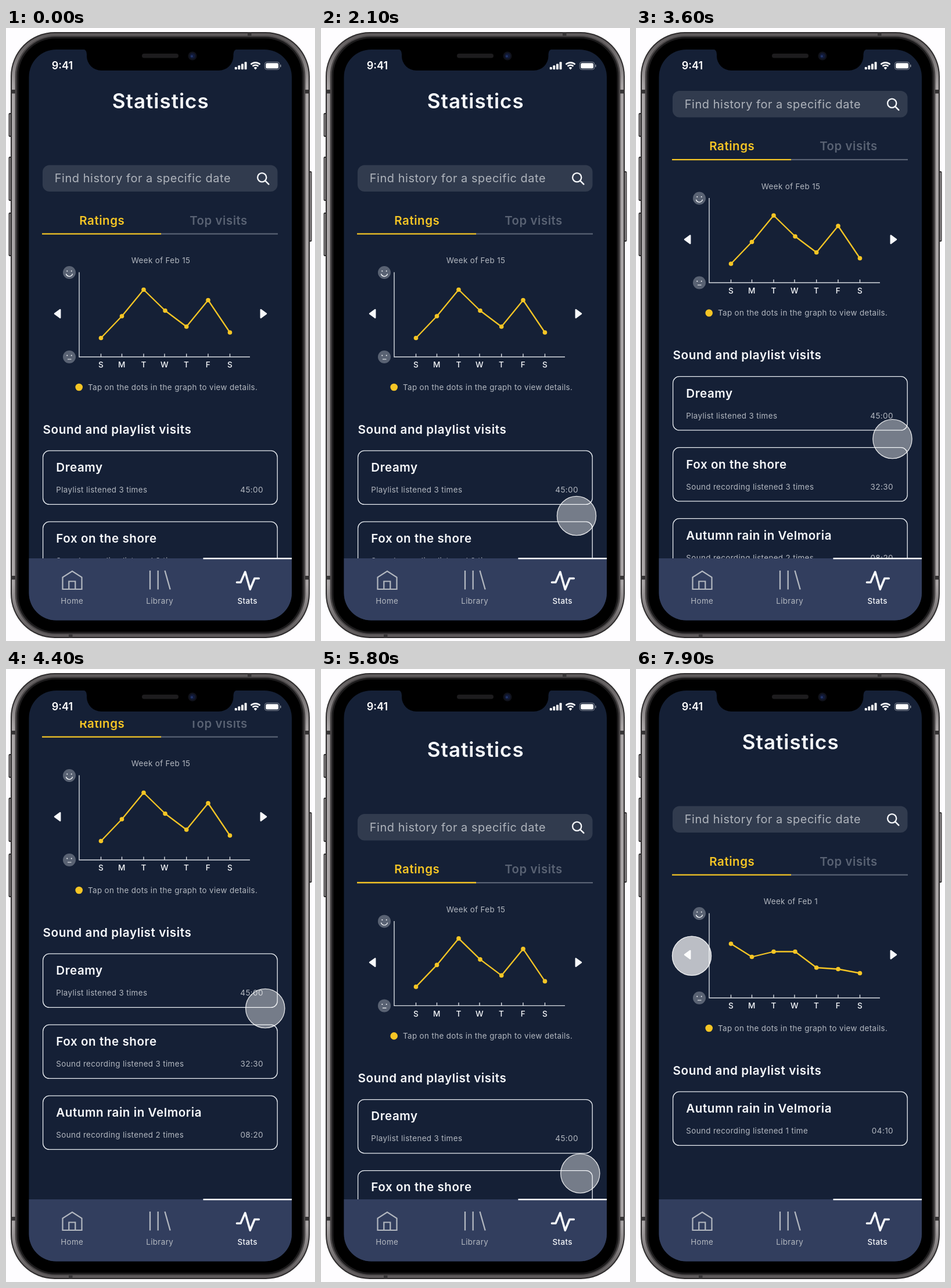
Animation of 532x1053 px, one loop 8 s. Source, as an HTML page with a canvas:

```html
<!DOCTYPE html>
<html lang="en">
<head>
<meta charset="utf-8">
<title>Statistics screen</title>
<style>
html, body { margin: 0; width: 100%; height: 100%; overflow: hidden; background: #fefdff; }
canvas { display: block; width: 532px; height: 1053px; }
</style>
</head>
<body>
<canvas id="stage"></canvas>
<script>
const W = 532, H = 1053, LOOP = 8000, STEP = 100;
const canvas = document.getElementById('stage');
const ratio = window.devicePixelRatio || 1;
canvas.width = W * ratio;
canvas.height = H * ratio;
const ctx = canvas.getContext('2d');
const TAU = Math.PI * 2;

const NAVY = '#152036', WHITE = '#f7f9fc', YELLOW = '#f5c525';
const SOFT = '#b3b8c0', MUTED = '#596273', NAV = '#323e5e';

// ---- drawing helpers ----
function rounded(x, y, w, h, r) {
  ctx.beginPath();
  ctx.roundRect(x, y, w, h, r);
}
function fillRound(x, y, w, h, r, color) {
  rounded(x, y, w, h, r);
  ctx.fillStyle = color;
  ctx.fill();
}
function disc(x, y, r, color) {
  ctx.beginPath();
  ctx.arc(x, y, r, 0, TAU);
  ctx.fillStyle = color;
  ctx.fill();
}
function path(points, color, width, closed) {
  ctx.beginPath();
  points.forEach(([x, y]) => ctx.lineTo(x, y));
  if (closed) ctx.closePath();
  ctx.strokeStyle = color;
  ctx.lineWidth = width;
  ctx.stroke();
}
function arc(x, y, r, from, to, color, width) {
  ctx.beginPath();
  ctx.arc(x, y, r, from, to);
  ctx.strokeStyle = color;
  ctx.lineWidth = width;
  ctx.stroke();
}
function text(str, x, y, size, { weight = 400, color = WHITE, align = 'left', spacing = 0.027 } = {}) {
  ctx.font = `${weight} ${size}px Inter, "Open Sans", sans-serif`;
  ctx.letterSpacing = `${size * spacing}px`;
  ctx.textAlign = align;
  ctx.fillStyle = color;
  ctx.fillText(str, x, y);
}

// ---- motion ----
// Smooth curve through [time, value] keys, flat at turning points and plateaus.
function track(keys, t) {
  const last = keys.length - 1;
  if (t <= keys[0][0]) return keys[0][1];
  if (t >= keys[last][0]) return keys[last][1];
  const slope = i => {
    if (i === 0 || i === last) return 0;
    const [a, b, c] = [keys[i - 1], keys[i], keys[i + 1]];
    return (b[1] - a[1]) * (c[1] - b[1]) <= 0 ? 0 : (c[1] - a[1]) / (c[0] - a[0]);
  };
  const i = keys.findIndex(k => k[0] > t) - 1;
  const [t0, v0] = keys[i], [t1, v1] = keys[i + 1];
  const d = t1 - t0, u = (t - t0) / d, w = 1 - u;
  return v0 * w * w * (1 + 2 * u) + v1 * u * u * (3 - 2 * u)
    + d * u * w * (slope(i) * w - slope(i + 1) * u);
}
const ramp = (t, from, to) => Math.max(0, Math.min(1, (t - from) / (to - from)));
const pulse = (t, at) => Math.max(0, 1 - Math.max(0, Math.abs(t - at) - 50) / 150);

const SCROLL = [[2150, 0], [2800, -89.7], [3200, -89.7], [3600, -127.5], [4400, -237], [4600, -241],
  [5500, -2], [5800, 13.4], [6000, 15], [6150, 15], [6550, 0]];
const FINGER_Y = [[2150, 838], [2800, 748.3], [3200, 748.3], [3600, 706], [4400, 583], [4600, 575],
  [5500, 840], [5800, 866.5], [6000, 870]];
const FINGER_X = [[3200, 440], [3600, 441.5], [4400, 446.3]];

// ---- content ----
const DAYS = [163.5, 199.5, 237, 273, 310.7, 348, 385.5];
const LATE = [532.5, 495, 449.5, 485.5, 513, 467.5, 523];
const EARLY = [472, 494.5, 485.5, 485.5, 513, 515.5, 522.5];
const CARDS = [
  ['Dreamy', 'Playlist listened 3 times', '45:00'],
  ['Fox on the shore', 'Sound recording listened 3 times', '32:30'],
  ['Autumn rain in Velmoria', 'Sound recording listened 2 times', '08:20']
];
const WEEKS = [
  { from: 0, day: 15, ratings: LATE, cards: CARDS },
  { from: 7100, day: 8, ratings: LATE.map((y, i) => (y + EARLY[i]) / 2), cards: CARDS },
  { from: 7800, day: 1, ratings: EARLY,
    cards: [['Autumn rain in Velmoria', 'Sound recording listened 1 time', '04:10']] }
];

// ---- phone ----
function drawPhone() {
  ctx.fillStyle = '#fefdff';
  ctx.fillRect(0, 0, W, H);
  for (const [x, y, h] of [[4.5, 146, 41], [4.5, 221, 76], [4.5, 317, 75], [519.5, 246, 121]]) {
    fillRound(x, y, 7, h, 2, '#2d2c2d');
    fillRound(x + 1.2, y + 2, 4.6, h - 4, 1, '#858283');
  }
  const metal = ctx.createLinearGradient(0, 7, 0, 1048);
  metal.addColorStop(0, '#5c5859');
  metal.addColorStop(0.03, '#6e6a6b');
  metal.addColorStop(0.09, '#a8a4a5');
  metal.addColorStop(0.91, '#a8a4a5');
  metal.addColorStop(0.97, '#6e6a6b');
  metal.addColorStop(1, '#5c5859');
  const rings = [[8, 7, 76, '#2e2c2d'], [10, 9, 74, metal], [15.5, 13, 70, '#4a4748'],
    [18.5, 15, 67, '#1c1b1c'], [21.5, 18, 64, '#000']];
  for (const [x, y, r, color] of rings) fillRound(x, y, 531 - 2 * x, 1055 - 2 * y, r, color);
  ctx.fillStyle = '#373536';
  for (const y of [106, 941]) {
    ctx.fillRect(8, y, 8, 6.5);
    ctx.fillRect(515, y, 8, 6.5);
  }
  ctx.fillRect(416, 7, 6.5, 6.5);
  ctx.fillRect(108, 1041.5, 6.5, 6.5);
  fillRound(39.5, 37, 452.5, 980.5, 47, NAVY);
}

function drawNotch() {
  ctx.beginPath();
  ctx.moveTo(132, 36);
  ctx.quadraticCurveTo(139, 37, 139, 45);
  ctx.arcTo(139, 73, 163, 73, 25);
  ctx.arcTo(391.5, 73, 391.5, 45, 25);
  ctx.lineTo(391.5, 45);
  ctx.quadraticCurveTo(391.5, 37, 399, 36);
  ctx.fillStyle = '#000';
  ctx.fill();
  fillRound(234, 44, 63, 7.5, 4, '#1d1c1e');
  disc(321, 48, 7.5, '#10121b');
  disc(321, 48, 4.8, '#111a38');
  disc(320, 48.5, 2, '#22356a');
}

function drawStatus() {
  text('9:41', 97, 71, 18.1, { weight: 600, align: 'center', spacing: 0, color: '#fff' });
  [4.3, 7, 9.7, 13].forEach((h, i) => fillRound(393.8 + i * 5.6, 71.3 - h, 3.9, h, 1, '#fff'));
  const up = -Math.PI / 2;
  ctx.lineCap = 'butt';
  for (const r of [7.2, 11.6]) arc(429.5, 71, r, up - 0.76, up + 0.76, '#fff', 2.6);
  ctx.beginPath();
  ctx.moveTo(429.5, 71.5);
  ctx.arc(429.5, 71.5, 4.2, up - 0.74, up + 0.74);
  ctx.fillStyle = '#fff';
  ctx.fill();
  rounded(445.3, 58.4, 25.6, 13, 4);
  ctx.strokeStyle = '#848b98';
  ctx.lineWidth = 1;
  ctx.stroke();
  fillRound(447.2, 60.3, 21.8, 9.2, 2.3, '#fff');
  fillRound(472, 62.8, 1.6, 4.4, 1, '#848b98');
}

// ---- scrolling page ----
function drawFace(y, happy) {
  disc(109, y, 11, MUTED);
  disc(105.3, y - 2.4, 1, WHITE);
  disc(112.7, y - 2.4, 1, WHITE);
  if (happy) arc(109, y + 0.8, 5.8, 0.25, Math.PI - 0.25, WHITE, 1.2);
  else path([[106, y + 4], [112.5, y + 4]], WHITE, 1.2);
}

function drawArrow(tip, base) {
  ctx.lineJoin = 'round';
  const points = [[tip, 490.7], [base, 484], [base, 497.4]];
  path(points, WHITE, 2.5, true);
  ctx.fillStyle = WHITE;
  ctx.fill();
}

function drawChart(week) {
  text(`Week of Feb ${week.day}`, 266.5, 404.4, 13.4, { color: SOFT, align: 'center' });
  ctx.lineCap = 'butt';
  ctx.lineJoin = 'miter';
  path([[126, 419.5], [126, 565], [420, 565]], '#d9dde3', 1.4);
  DAYS.forEach((x, i) => {
    path([[x, 559.5], [x, 565]], '#d9dde3', 1.4);
    text('SMTWTFS'[i], x, 583.2, 13.6, { weight: 500, align: 'center' });
  });
  drawFace(420, true);
  drawFace(565, false);
  drawArrow(84, 93.2);
  drawArrow(448, 438.8);
  const points = DAYS.map((x, i) => [i === 3 ? x + 1 : x, week.ratings[i]]);
  path(points, YELLOW, 2.3);
  points.forEach(([x, y]) => disc(x, y, 3.8, YELLOW));
  disc(125.7, 617, 6.3, YELLOW);
  text('Tap on the dots in the graph to view details.', 141, 621.9, 13.4, { color: SOFT });
}

function drawCard([title, detail, length], i) {
  const y = 726.2 + i * 122;
  rounded(63.6, y, 403.6, 92.2, 11);
  ctx.strokeStyle = '#e9edf2';
  ctx.lineWidth = 1.3;
  ctx.stroke();
  text(title, 86.3, y + 35.8, 20.6, { weight: 600 });
  text(detail, 86.3, y + 71.8, 13.4, { color: SOFT });
  text(length, 443, y + 71.8, 13.6, { color: SOFT, align: 'right' });
}

function drawPage(week, scroll) {
  ctx.save();
  ctx.beginPath();
  ctx.rect(39.5, 89, 452.5, 822);
  ctx.clip();
  ctx.translate(0, scroll);
  text('Statistics', 266.2, 137.6, 35, { weight: 600, align: 'center' });
  fillRound(63, 235.5, 404.5, 45.5, 12, '#313b4e');
  text('Find history for a specific date', 83.8, 265.3, 19.95, { color: '#afb4bc' });
  ctx.lineCap = 'round';
  arc(440.7, 256.8, 7.6, 0, TAU, WHITE, 2.3);
  path([[446.3, 262.4], [452.3, 268.3]], WHITE, 2.5);
  text('Ratings', 165.3, 337.8, 20.5, { weight: 600, color: YELLOW, align: 'center' });
  text('Top visits', 366, 337.8, 20.4, { weight: 600, color: MUTED, align: 'center' });
  ctx.lineCap = 'butt';
  path([[266, 353.7], [468, 353.7]], MUTED, 2.2);
  path([[62, 353.6], [267, 353.6]], YELLOW, 2.4);
  drawChart(week);
  text('Sound and playlist visits', 63.6, 696.6, 20.7, { weight: 600 });
  week.cards.forEach(drawCard);
  ctx.restore();
}

function drawNav() {
  fillRound(39.5, 911, 452.5, 106.5, [0, 0, 47, 47], NAV);
  ctx.lineCap = 'butt';
  path([[339.5, 911.3], [492, 911.3]], WHITE, 2.5);
  ctx.lineJoin = 'miter';
  path([[97.5, 964], [97.5, 943.5], [114, 933], [130.5, 943.5], [130.5, 964]], SOFT, 2.2, true);
  path([[108.3, 964], [108.3, 950.5], [119.3, 950.5], [119.3, 964]], SOFT, 2.2);
  for (const [top, foot] of [[248, 248], [261.7, 261.7], [273.5, 282.7]])
    path([[top, 932], [foot, 964.5]], SOFT, 2.3);
  ctx.lineCap = ctx.lineJoin = 'round';
  path([[397.5, 952.3], [404, 952.3], [411.8, 934.3], [420.3, 964.3], [428, 945.5], [435.3, 945.5]], WHITE, 3.6);
  text('Home', 113.7, 988.7, 13.4, { color: SOFT, align: 'center' });
  text('Library', 264.7, 988.7, 13.4, { color: SOFT, align: 'center' });
  text('Stats', 415.7, 988.7, 13.4, { weight: 500, align: 'center' });
}

function drawTouch(x, y, fill, alpha) {
  if (alpha <= 0) return;
  ctx.save();
  ctx.globalAlpha = alpha;
  disc(x, y, 34, `rgba(255,255,255,${fill})`);
  arc(x, y, 33.6, 0, TAU, 'rgba(255,255,255,.8)', 1.3);
  ctx.restore();
}

function draw(t) {
  ctx.setTransform(ratio, 0, 0, ratio, 0, 0);
  drawPhone();
  drawPage(WEEKS.findLast(w => t >= w.from), track(SCROLL, t));
  drawNav();
  drawNotch();
  drawStatus();
  drawTouch(track(FINGER_X, t), track(FINGER_Y, t), 0.41,
    ramp(t, 1850, 2050) * (1 - ramp(t, 6100, 6300)));
  const press = Math.max(pulse(t, 7150), pulse(t, 7850));
  drawTouch(96, 492.7, 0.41 + 0.3 * press, ramp(t, 6750, 6950));
}

function frame(now) {
  draw(Math.floor((now % LOOP) / STEP) * STEP);
  requestAnimationFrame(frame);
}
draw(0);
requestAnimationFrame(frame);
</script>
</body>
</html>
```
